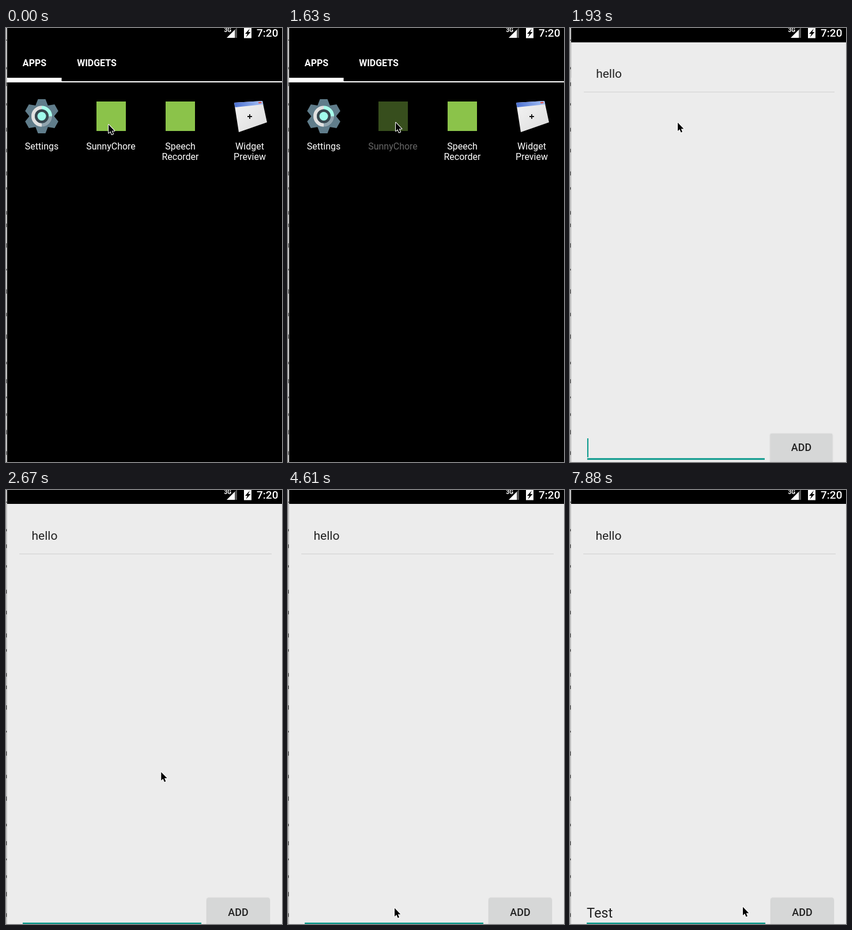
These frames come from a looping animation (479x750 px, 8 s). An HTML page:

```html
<!DOCTYPE html>
<html lang="en">
<head>
<meta charset="utf-8">
<title>Adding a to-do item</title>
<style>
html, body { margin: 0; width: 100%; height: 100%; overflow: hidden; background: #000; }
svg { display: block; width: 479px; height: 750px; font-family: Roboto, "Noto Sans", sans-serif; }
.mid { text-anchor: middle; }
</style>
</head>
<body>
<svg viewBox="0 0 479 750">
  <defs>
    <linearGradient id="shade" x2="0" y2="1">
      <stop stop-opacity=".6"/><stop offset="1" stop-opacity=".85"/>
    </linearGradient>
    <linearGradient id="band" x2="1" y2="0">
      <stop stop-color="#4a6fd0"/><stop offset="1" stop-color="#a9c4f5"/>
    </linearGradient>
    <linearGradient id="sheet" x2="1" y2="1">
      <stop stop-color="#f4f4f4"/><stop offset="1" stop-color="#dcdcdc"/>
    </linearGradient>
    <filter id="soft" x="-20%" y="-20%" width="140%" height="150%">
      <feDropShadow dx="0" dy="1" stdDeviation="1" flood-opacity=".3"/>
    </filter>
  </defs>

  <g id="drawer" fill="#fff" font-size="16">
    <rect width="479" height="750" fill="#000"/>
    <g class="mid" font-weight="700">
      <text x="49.5" y="65.5">APPS</text><text x="157.5" y="65.5">WIDGETS</text>
    </g>
    <path d="M2 86H96.5V92H479V94H2Z"/>

    <g transform="translate(62 152.5)">
      <g id="gear" fill="#607d8b"><circle r="21.5"/></g>
      <circle r="18.5" fill="#546e7a"/>
      <g fill="none" stroke-width="6">
        <circle r="15" stroke="#90a4ae"/>
        <path d="M0 15A15 15 0 0 1 0-15" stroke="#e0e0e0"/>
        <path d="M0-15A15 15 0 0 1 15 0" stroke="#a7ffeb"/>
      </g>
      <circle r="12" fill="#37474f"/>
      <circle r="7.5" fill="#a0fbec"/>
    </g>
    <text class="mid" x="62" y="210">Settings</text>

    <g id="pressed">
      <rect x="157" y="127" width="51" height="51" fill="#8bc34a"/>
      <text class="mid" x="182" y="210">SunnyChore</text>
    </g>

    <rect x="277" y="127" width="51" height="51" fill="#8bc34a"/>
    <text class="mid" x="302.5" y="210">Speech<tspan x="302.5" dy="18">Recorder</tspan></text>

    <path d="M396 129L445 126 453 163 404 180Z" fill="url(#sheet)"/>
    <path d="M396 129L445 126 446.5 132 397.500 137Z" fill="url(#band)"/>
    <path d="M438 128L443 127.500 443.500 130 438.500 130.500Z" fill="#e05a50"/>
    <path d="M419 153H427M423 149V157" stroke="#111" stroke-width="1.8"/>
    <text class="mid" x="423" y="210">Widget<tspan x="423" dy="18">Preview</tspan></text>
  </g>

  <rect id="shadow" x="70" y="55.500" width="282" height="19" fill="url(#shade)"/>

  <g id="app" fill="#212121">
    <rect x="1" y="24" width="481" height="756" fill="#ececec"/>
    <g id="content">
      <text x="44.5" y="86" font-size="21">hello</text>
      <path d="M23 110.5H461" stroke="#d0d0d0"/>
      <rect x="29" y="747.6" width="310" height="2.8" fill="#009688"/>
      <text id="field" x="29" y="739" font-size="23.5"></text>
      <rect id="caret" y="713" width="2" height="33" fill="#009688"/>
      <rect x="349" y="704.5" width="108" height="49" rx="2" fill="#d6d7d7" filter="url(#soft)"/>
      <text class="mid" x="403" y="735.5" font-size="18" font-weight="500">ADD</text>
    </g>
  </g>

  <g fill="#fff">
    <text x="378.5" y="7" font-size="10" font-weight="700">3G</text>
    <path d="M383 17L397 3V17Z"/>
    <path d="M397 3L401-1V17H397Z" fill="#555"/>
    <path d="M413 0H426V17.5H413Z"/>
    <path d="M423 1L415 10H419L416.500 16 424.500 7H420.500Z" fill="#000"/>
    <text x="435" y="15" font-size="19" font-weight="500">7:20</text>
  </g>

  <g id="edge"><rect width="2" height="750" fill="#c4c4c4"/></g>
  <path id="cursor" d="M0 0V14.5L3.3 11.5 5.6 17 8 16 5.7 10.7H10.3Z"
    stroke="#fff" stroke-width="2" stroke-linejoin="round" paint-order="stroke"/>
</svg>
<script>
const $ = id => document.getElementById(id);
const set = (id, name, value) => $(id).setAttribute(name, value);
const show = (id, on) => set(id, "visibility", on ? "visible" : "hidden");
const easeOut = (u, power) => 1 - (1 - u) ** power;

function add(parent, tag, attrs) {
  const el = document.createElementNS("http://www.w3.org/2000/svg", tag);
  for (const k in attrs) el.setAttribute(k, attrs[k]);
  $(parent).append(el);
}

for (let a = 0; a < 360; a += 60)
  add("gear", "path", { d: "M-11-18L-6.5-29.5H6.5L11-18Z", transform: `rotate(${a})` });

// Slivers of the window behind the phone
let seed = 7;
const random = () => (seed = seed * 16807 % 2147483647) / 2147483647;
for (let y = 20; y < 740; y += 20 + 30 * random())
  add("edge", "rect", { y, width: 1.3, height: 2 + 6 * random(), fill: "#444" });

const LOOP = 8000, STEP = 148.6, FIRST = 440;
const OPEN = 9, SETTLED = 11, TYPE = 42, IDLE = 48;

// Cursor stops: [step, x, y]
const stops = [
  [-1, 178, 167], [2, 197, 297], [5, 187, 163.5], [SETTLED, 187, 163.5], [20, 306, 632],
  [21, 306, 632], [24, 401, 722], [29, 176, 722.5], [47, 176, 722.5], [50, 300, 720.5]
];

function cursorAt(k) {
  const i = stops.findIndex(s => s[0] >= k);
  if (i < 1) return stops.at(i).slice(1);
  const [k0, x0, y0] = stops[i - 1], [k1, x1, y1] = stops[i];
  const p = easeOut((k - k0) / (k1 - k0), 2);
  return [x0 + (x1 - x0) * p, y0 + (y1 - y0) * p];
}

function draw(now) {
  const k = Math.floor((now % LOOP - FIRST) / STEP);
  set("cursor", "transform", `translate(${cursorAt(k)})`);

  set("pressed", "opacity", k < OPEN - 1 ? 1 : .4);
  show("drawer", k < SETTLED);
  show("shadow", k === OPEN);

  // The app window grows out of a small translucent card
  const u = Math.min(1, Math.max(0, (k - OPEN) / (SETTLED - OPEN)));
  const p = easeOut(u, 6), rest = 1 - p;
  set("app", "transform",
    `translate(${69.5 * rest} ${60.5 * rest}) scale(${1 - .413 * rest} ${1 - .4375 * rest})`);
  set("app", "opacity", k < OPEN ? 0 : Math.min(1, .763 + p));
  set("content", "opacity", Math.min(1, .6 + p));

  const letters = Math.max(0, Math.ceil((k - TYPE + 1) * 4 / 3));
  $("field").textContent = "Test".slice(0, letters);
  set("caret", "x", 29 + $("field").getComputedTextLength());
  show("caret", k < TYPE ? (k - OPEN) % 7 < 3 : k < IDLE);
  requestAnimationFrame(draw);
}
draw(0);
</script>
</body>
</html>
```
